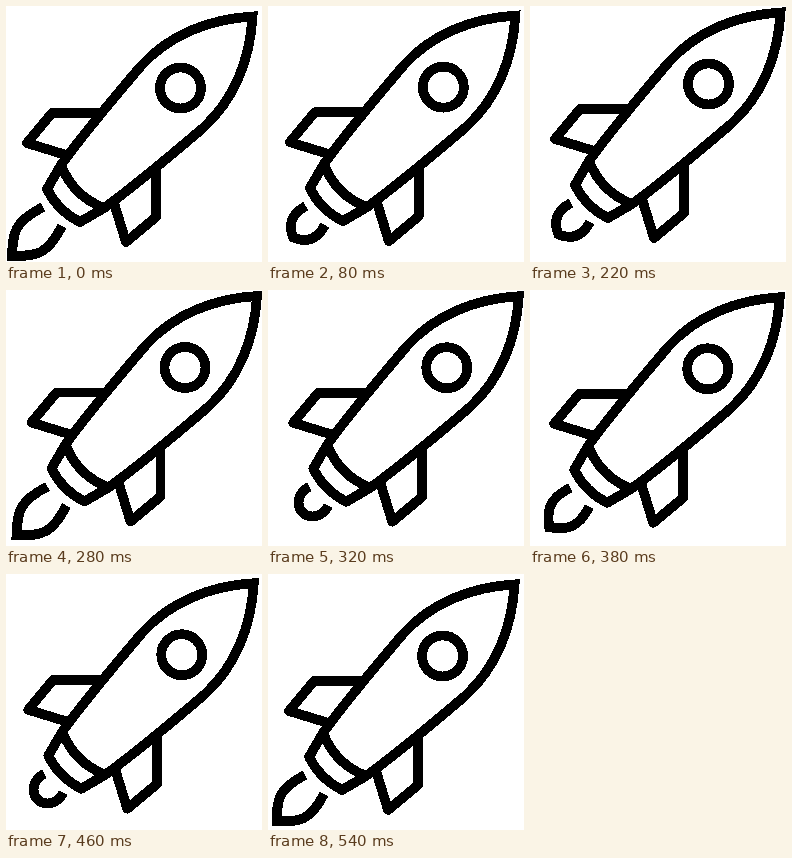
Recreate the animation shown at these times as an HTML page. Size 256 by 256 pixels, loop 560 ms.

```html
<!DOCTYPE html>
<html lang="en">
<head>
<meta charset="utf-8">
<title>Rocket</title>
<style>
  html, body { margin: 0; height: 100%; overflow: hidden; background: #fff; }
  svg { display: block; width: 100vw; height: 100vh; }
</style>
</head>
<body>
<svg viewBox="0 0 256 256" shape-rendering="crispEdges">
  <g id="rocket" fill="none" stroke="#000" stroke-width="9.8" stroke-linejoin="round">
    <path stroke-linejoin="miter" d="M55 159C70 138 106 94 135 60C163 29 203 13 246.500 10.500C244 54 228 94 197 122C163 151 119 187 98 202"/>
    <path d="M98 202Q67 190 55 159L41 183Q52 205 74 216Z"/>
    <path d="M95 107H46L21 137L60 149M150 162V211L120 236L108 197"/>
    <circle cx="174.500" cy="82" r="20.500"/>
    <path id="flame" stroke-linejoin="miter"/>
  </g>
</svg>
<script>
const LOOP = 560, FLICKER = 140, SHRINK = 47, STEP = 20;
const rocket = document.getElementById('rocket');
const flame = document.getElementById('flame');

// Half of the flame, from its root to its tip
const longFlame = [[37, 201], [8, 216], [7, 226], [6, 250]];
const shortFlame = [[37, 201], [27, 206], [24, 218], [31.5, 225.5]];

const ease = p => (1 - Math.cos(Math.PI * p)) / 2;
const mirror = ([x, y]) => [257 - y, 257 - x];

function flamePath(k) {
  const [root, a, b, tip] = longFlame.map((p, i) =>
    p.map((v, j) => v + (shortFlame[i][j] - v) * k));
  return `M${root}C${a} ${b} ${tip}C${mirror(b)} ${mirror(a)} ${mirror(root)}`;
}

function draw(now) {
  const t = Math.floor(now % LOOP / STEP) * STEP;
  const shift = 4.5 * ease(2 * t / LOOP);
  const f = t % FLICKER;
  const k = f < SHRINK ? ease(f / SHRINK) : ease((FLICKER - f) / (FLICKER - SHRINK));
  rocket.setAttribute('transform', `translate(${shift} ${-shift})`);
  flame.setAttribute('d', flamePath(k));
  requestAnimationFrame(draw);
}
draw(performance.now());
</script>
</body>
</html>
```
